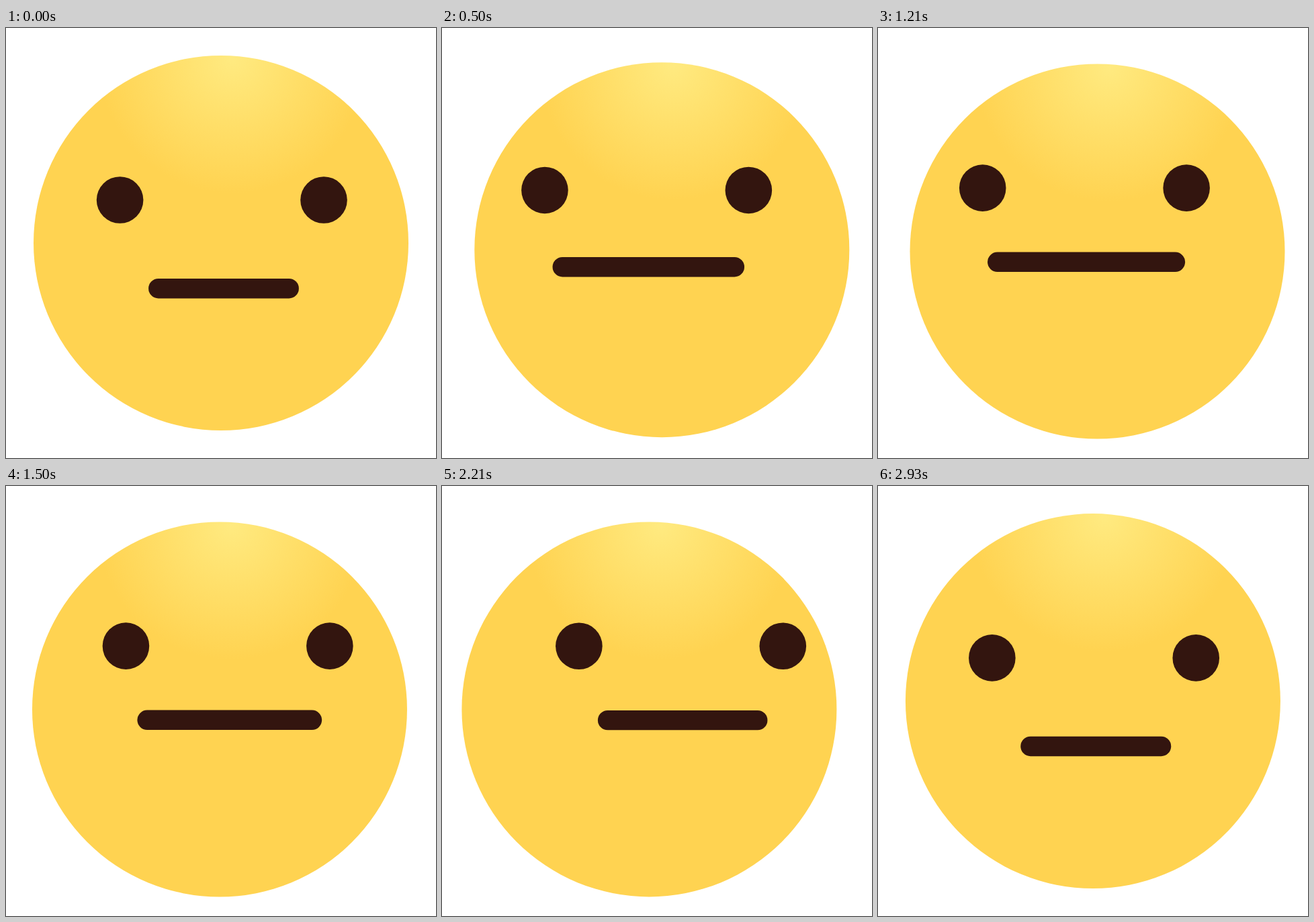
An HTML page that plays this animation: 640 by 640 pixels, repeating every 3 s.

```html
<!DOCTYPE html>
<html lang="en">
<head>
<meta charset="utf-8">
<title>Looking around</title>
<style>
  html, body { margin: 0; width: 100%; height: 100%; overflow: hidden; background: #fff; }
  svg { display: block; width: 100%; height: 100%; }
</style>
</head>
<body>
<svg viewBox="0 0 640 640">
  <defs>
    <radialGradient id="glow" gradientUnits="userSpaceOnUse" cx="17" cy="-274" r="200">
      <stop offset="0" stop-color="#ffea80"/>
      <stop offset="1" stop-color="#ffd351"/>
    </radialGradient>
  </defs>
  <circle id="head" r="279" fill="url(#glow)"/>
  <g fill="#33150f">
    <ellipse class="eye" rx="34.8"/>
    <ellipse class="eye" rx="34.8"/>
  </g>
  <line id="mouth" stroke="#33150f" stroke-width="29.4" stroke-linecap="round"/>
</svg>
<script>
const LOOP = 3000, FPS = 14;
const EYE_RADIUS = 34.8, EYE_GAP = 303.4;

// Each pose: head x, y; left eye x, y; mouth start x, end x, y
const home = [320, 320, 169.6, 256, 226.8, 421.2, 387.7];
const left = [329, 332.5, 149.1, 238.1, 168.3, 438.6, 348.3];
const right = [308.3, 332.5, 204.2, 238.1, 246.8, 470.2, 348.3];
const poses = [[0, home], [767, left], [833, left], [2133, right], [3000, home]];
const blink = [[0, [1]], [833, [1]], [933, [0.1]], [1033, [1]], [3000, [1]]];

const head = document.getElementById("head");
const eyes = document.querySelectorAll(".eye");
const mouth = document.getElementById("mouth");

const linear = u => u;

// cubic-bezier(.6, 0, .4, 1), solved by bisection
function easeInOut(u) {
  let low = 0, high = 1;
  for (let i = 0; i < 24; i++) {
    const s = (low + high) / 2, r = 1 - s;
    const x = 3 * r * r * s * 0.6 + 3 * r * s * s * 0.4 + s * s * s;
    if (x < u) low = s; else high = s;
  }
  return low * low * (3 - 2 * low);
}

function sample(keys, time, ease) {
  const next = Math.max(1, keys.findIndex(([at]) => at > time));
  const [t0, from] = keys[next - 1], [t1, to] = keys[next];
  const p = ease((time - t0) / (t1 - t0));
  return from.map((v, i) => v + (to[i] - v) * p);
}

function set(node, attrs) {
  for (const name in attrs) node.setAttribute(name, attrs[name]);
}

function draw(time) {
  const [hx, hy, ex, ey, m1, m2, my] = sample(poses, time, easeInOut);
  const [open] = sample(blink, time, linear);
  set(head, { transform: `translate(${hx} ${hy})` });
  eyes.forEach((eye, i) => set(eye, { cx: ex + i * EYE_GAP, cy: ey, ry: EYE_RADIUS * open }));
  set(mouth, { x1: m1, x2: m2, y1: my, y2: my });
}

const start = performance.now();

// Steps change on whole hundredths of a second
function tick() {
  const time = Math.max(0, performance.now() - start) % LOOP;
  const step = Math.floor((Math.floor(time / 10) * 10 + 5) * FPS / 1000);
  draw(step * 1000 / FPS % LOOP);
  requestAnimationFrame(tick);
}
tick();
</script>
</body>
</html>
```
